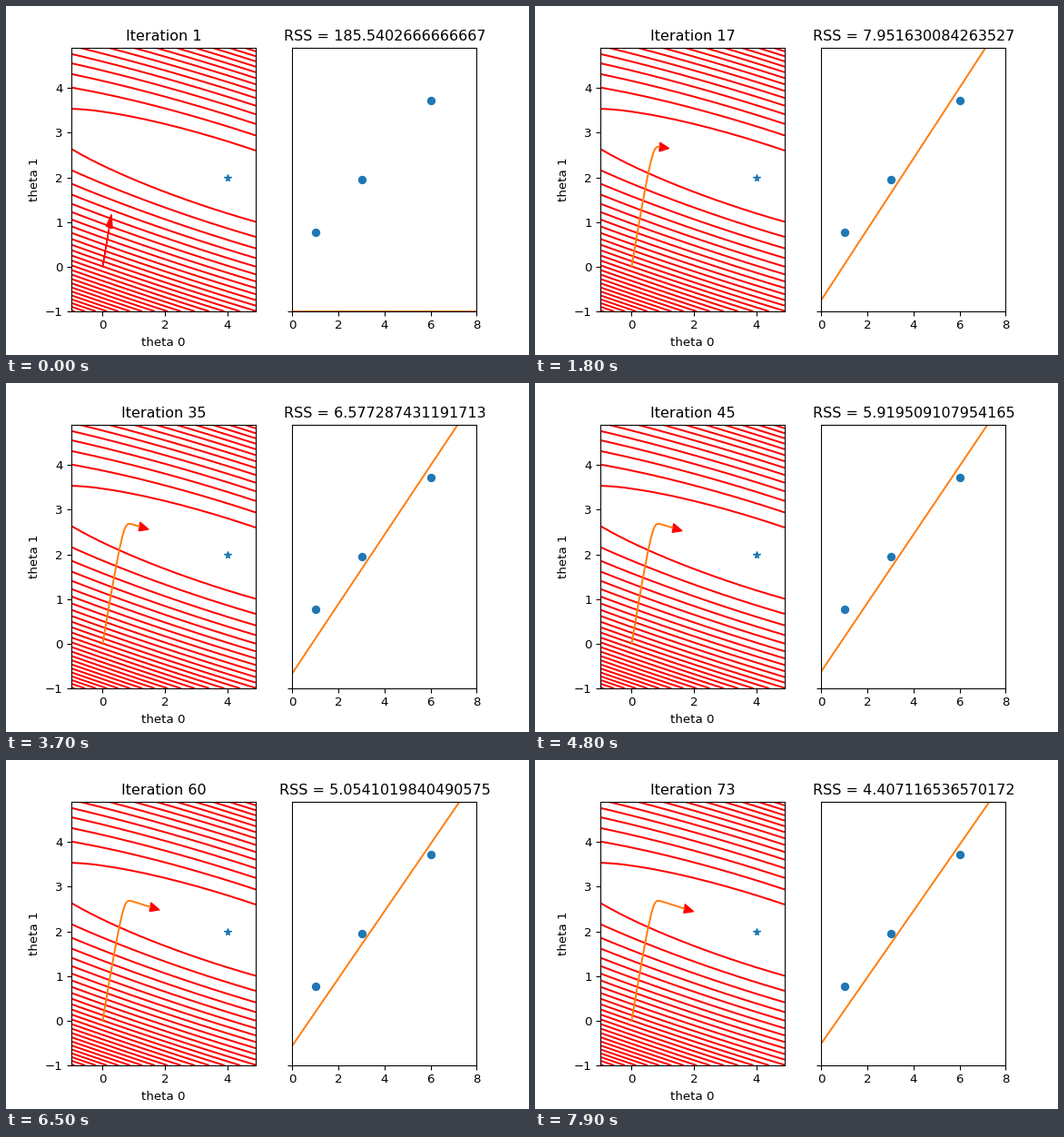
These frames come from a looping animation (576x384 px, 8000 ms). A matplotlib script:

```python
import numpy as np
import matplotlib.pyplot as plt
from matplotlib.animation import FuncAnimation

FRAMES, INTERVAL = 80, 100   # ms
STEP_MS = 110                # one descent step
RATE = 0.02

x = np.array([1.0, 3.0, 6.0])
best = np.array([4.0, 2.0])
X = np.column_stack([np.ones_like(x), x])
y = X @ best


def rss(theta):
    return np.sum((y - X @ theta) ** 2)


def descend(steps):
    path = [np.zeros(2)]
    for _ in range(steps):
        theta = path[-1]
        grad = X.T @ (X @ theta - y) / len(x)
        path.append(theta - RATE * grad)
    return np.array(path)


def step_at(frame):
    return int((frame + 0.5) * INTERVAL // STEP_MS)


path = descend(step_at(FRAMES) + 1)

plt.rcParams["font.family"] = "DejaVu Sans"
fig, (left, right) = plt.subplots(1, 2, figsize=(6, 4), dpi=96)
fig.subplots_adjust(left=0.125, right=0.9, bottom=0.125, top=0.88, wspace=0.2)

# Loss surface with the descent path
grid = np.arange(-1, 4.95, 0.1)
T0, T1 = np.meshgrid(grid, grid)
loss = sum((yi - T0 - T1 * xi) ** 2 for xi, yi in zip(x, y))
left.contour(T0, T1, loss, levels=np.arange(30, 781, 30), colors="red",
             linewidths=1.5)
left.plot(*best, "*", color="C0")
trace, = left.plot([], [], color="C1")
arrow = left.arrow(0, 0, *path[1], head_width=0.2, head_length=0.3,
                   fc="red", ec="red")
left.set(xlim=(-1, 4.9), ylim=(-1, 4.9), xlabel="theta 0", ylabel="theta 1")

# Data and the fitted line
right.plot(x, y, "o", color="C0")
span = np.array([0.0, 8.0])
fit, = right.plot(span, 0 * span, color="C1")
right.set(xlim=(0, 8), ylim=(0, 20))
right.set_yticks([0], labels=[""])


def update(frame):
    n = step_at(frame)
    here, after = path[n], path[n + 1]
    dx, dy = after - here
    trace.set_data(path[:n + 1, 0], path[:n + 1, 1])
    arrow.set_data(x=here[0], y=here[1], dx=dx, dy=dy)
    fit.set_ydata(here[0] + here[1] * span)
    left.set_title(f"Iteration {n + 1}")
    right.set_title(f"RSS = {float(rss(after))}")
    return trace, arrow, fit


anim = FuncAnimation(fig, update, frames=FRAMES, interval=INTERVAL,
                     repeat=True, repeat_delay=0, blit=False)
plt.show()
```
